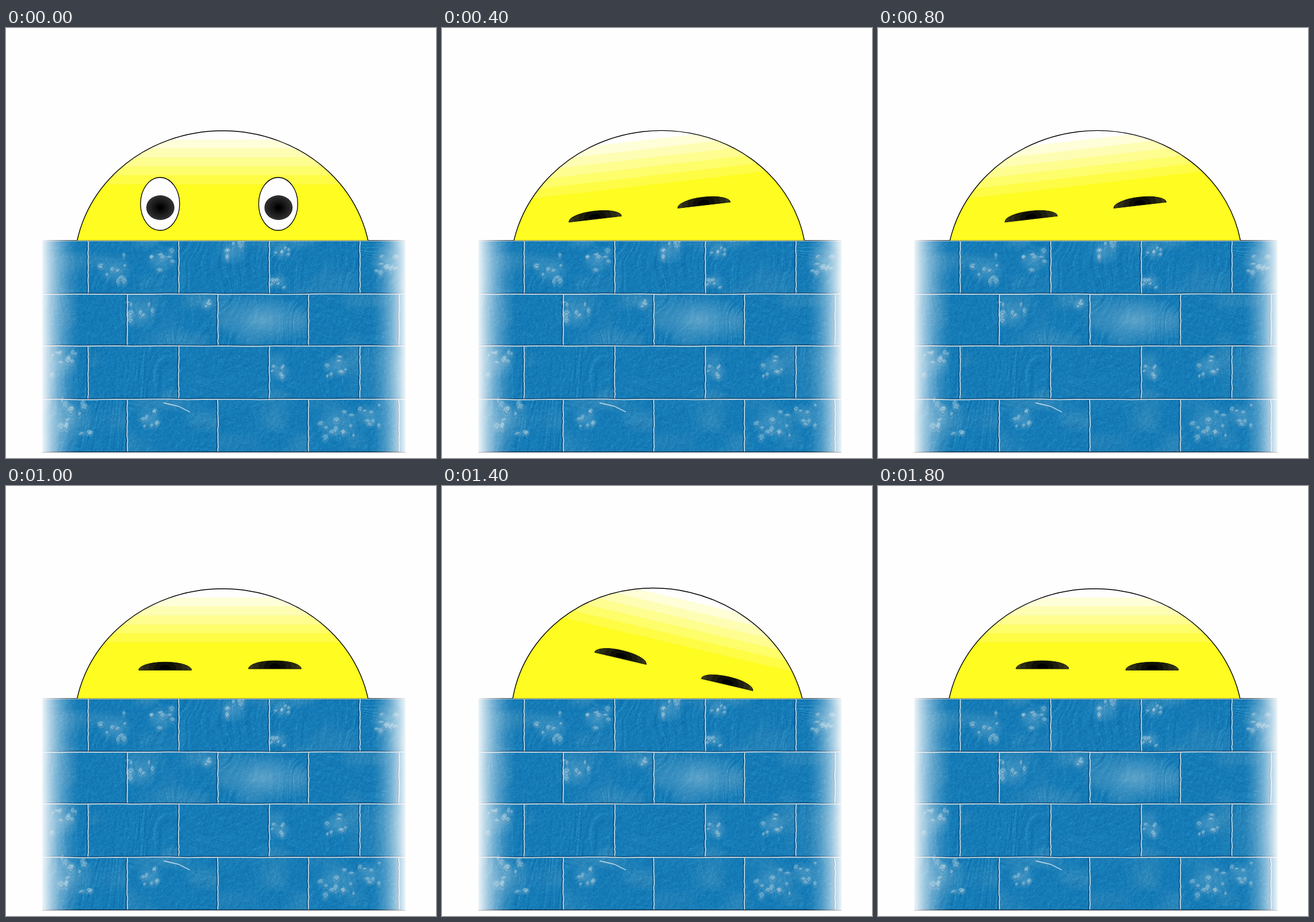
These frames come from a looping animation (748x748 px, 2 s). An HTML page with a canvas:

```html
<!DOCTYPE html>
<html lang="en">
<head>
<meta charset="utf-8">
<title>Peeking over the wall</title>
<style>
  html, body { margin: 0; width: 100%; height: 100%; overflow: hidden; background: #fefefe; }
  svg, canvas { position: absolute; left: 0; top: 0; width: 748px; height: 748px; display: block; }
</style>
</head>
<body>
<canvas id="wall" width="748" height="748"></canvas>
<svg viewBox="0 0 748 748" width="748" height="748">
  <defs>
    <linearGradient id="skin" gradientUnits="userSpaceOnUse" x1="0" y1="178" x2="0" y2="272"></linearGradient>
    <clipPath id="above"><rect width="748" height="369.5"/></clipPath>
    <clipPath id="lid"><path d="M-46 0A46 14 0 0 1 46 0Z"/></clipPath>
    <g id="slit">
      <g id="iris" clip-path="url(#lid)"></g>
      <path d="M-46 0A46 14 0 0 1 46 0Z" fill="none" stroke="#1a1a08"/>
    </g>
    <g id="eye">
      <ellipse rx="34" ry="46" fill="#fefefe" stroke="#000" stroke-width="1.3"/>
      <g id="pupil" transform="translate(.5 6.5)"></g>
    </g>
  </defs>
  <g clip-path="url(#above)">
    <g id="head">
      <ellipse cx="376.8" cy="415.3" rx="257.8" ry="236.6" fill="url(#skin)" stroke="#000" stroke-width="1.4"/>
      <g id="open">
        <use href="#eye" x="268" y="306"/>
        <use href="#eye" x="473.5" y="306"/>
      </g>
      <g id="shut">
        <use href="#slit" x="276.8" y="320.3"/>
        <use href="#slit" x="467.7" y="318"/>
      </g>
    </g>
  </g>
</svg>
<script>
const $ = id => document.getElementById(id);
const CX = 376.8, CY = 415.3, STEP = 200, STEPS = 10;

// --- Face shading in flat bands ---
const range = n => [...Array(n).keys()];

$('skin').innerHTML = range(7).map(i => {
  const c = `rgb(254,${254 - i / 3},${254 - 37 * i})`;
  return `<stop offset="${i / 6}" stop-color="${c}"/><stop offset="${Math.min(1, (i + 1) / 6)}" stop-color="${c}"/>`;
}).join('');

// Nested ellipses darkening to black in the middle
const rings = (n, rx, ry, y, tone) => range(n).map(i => {
  const s = 1 - i / n, c = tone.map(v => v * (n - 1 - i) / (n - 1));
  return `<ellipse cy="${y}" rx="${rx * s}" ry="${ry * s}" fill="rgb(${c})"/>`;
}).join('');

$('iris').innerHTML = rings(5, 48, 30, -3, [59, 58, 29]);
$('pupil').innerHTML = rings(5, 24.5, 21.5, 0, [45, 45, 45]);

// --- Wall ---
const L = 63, R = 695, T = 369, B = 738;
const rows = [T, 463, 553, 646, B];
const joint = (r, k) => (r % 2 ? 211 : 143) + 157.6 * k;

// Knotty places: x, y, spread
const knots = [
  [190, 420, 30], [270, 405, 25], [395, 388, 26], [480, 390, 16], [475, 440, 16],
  [660, 405, 28], [235, 500, 28], [350, 480, 12], [100, 585, 28], [575, 590, 22],
  [478, 600, 18], [115, 680, 40], [250, 680, 22], [575, 685, 36], [630, 675, 24]
];

let seed = 11;
const rnd = () => (seed = seed * 16807 % 2147483647) / 2147483647;
const jitter = size => (rnd() - 0.5) * size;

function hash(x, y) {
  let n = Math.imul(x, 374761393) + Math.imul(y, 668265263) | 0;
  n = Math.imul(n ^ n >>> 13, 1274126177);
  return ((n ^ n >>> 16) >>> 0) / 4294967296;
}

function noise(x, y) {
  const i = Math.floor(x), j = Math.floor(y);
  const ease = v => v * v * (3 - 2 * v);
  const u = ease(x - i), v = ease(y - j);
  const a = hash(i, j), b = hash(i + 1, j), c = hash(i, j + 1), d = hash(i + 1, j + 1);
  return a + (b - a) * u + (c - a) * v + (a - b - c + d) * u * v;
}

// Warped wood fibres with another direction in each brick
function grain(x, y, id) {
  const o = id * 37, turn = 0.5 + id % 5 * 0.3;
  const w = noise(x / 50 + o, y / 45) * 45;
  const p = x * Math.sin(turn) - y * Math.cos(turn) + w;
  const q = x * Math.cos(turn) + y * Math.sin(turn);
  return noise(p / 3.5 + o, q / 30) * 0.9 + noise(p / 9 + o, q / 50) * 1.3 + noise(x / 5 + o, y / 5) * 0.8;
}

function texture(ctx) {
  const w = R - L, img = ctx.createImageData(w, B - T);
  for (let k = 0, i = 0; k < img.data.length; k += 4, i++) {
    const x = i % w, y = Math.floor(i / w);
    const r = rows.findIndex(top => y + T < top) - 1;
    const id = r * 6 + Math.ceil((x + L - joint(r, 0)) / 157.6) + 1;
    const emboss = grain(x + 1, y + 1, id) - grain(x, y, id);
    const pale = Math.max(0, noise(x / 45 + id, y / 35) - 0.5) * 45;
    const v = emboss * 28 + (hash(x, y) - 0.5) * 26;
    const lift = Math.max(0, v - 9) + pale;
    img.data[k] = 21 + v * 0.5 + lift * 1.2;
    img.data[k + 1] = 123 + v * 0.85 + lift * 0.6;
    img.data[k + 2] = 182 + v * 0.75 + lift * 0.2;
    img.data[k + 3] = 255;
  }
  ctx.putImageData(img, L, T);
}

function halo(ctx, x, y, rx, ry, alpha) {
  const g = ctx.createRadialGradient(0, 0, 0, 0, 0, 1);
  g.addColorStop(0, `rgba(165,203,220,${alpha})`);
  g.addColorStop(1, 'rgba(165,203,220,0)');
  ctx.save();
  ctx.translate(x, y);
  ctx.scale(rx, ry);
  ctx.fillStyle = g;
  ctx.fillRect(-1, -1, 2, 2);
  ctx.restore();
}

function knot(ctx, [x, y, spread]) {
  halo(ctx, x, y, spread * 1.1, spread, 0.3);
  for (let i = 0; i < spread / 3; i++) {
    const kx = x + jitter(spread * 1.7), ky = y + jitter(spread * 1.6);
    const rx = 1.5 + rnd() * spread / 10, ry = 2 + rnd() * spread / 9, turn = jitter(1);
    const arc = (color, from, to) => {
      ctx.strokeStyle = color;
      ctx.beginPath();
      ctx.ellipse(kx, ky, rx, ry, turn, from, to);
      ctx.stroke();
    };
    halo(ctx, kx, ky, rx * 2, ry * 2, 0.55);
    arc('rgba(0,70,135,.5)', 0, 2.8);
    arc('rgba(210,226,232,.55)', 3.2, 5.8);
  }
}

function line(ctx, color, width, points) {
  ctx.strokeStyle = color;
  ctx.lineWidth = width;
  ctx.beginPath();
  points.forEach(p => ctx.lineTo(...p));
  ctx.stroke();
}

// A rough light seam with a dark edge beside it
function seam(ctx, x0, y0, x1, y1) {
  const down = x0 === x1;
  const points = range(21).map(i => {
    const s = i / 20, e = jitter(1.2);
    return [x0 + (x1 - x0) * s + (down ? e : 0), y0 + (y1 - y0) * s + (down ? 0 : e)];
  });
  const beside = points.map(([x, y]) => down ? [x - 1.8, y] : [x, y - 1.6]);
  line(ctx, 'rgba(6,44,84,.75)', 1.3, beside);
  line(ctx, '#d3e0e6', 1.6, points);
}

function fade(ctx, from, to) {
  const g = ctx.createLinearGradient(from, 0, to, 0);
  range(9).forEach(i => g.addColorStop(i / 8, `rgba(254,254,254,${0.93 * (1 - i / 8) ** 1.6})`));
  ctx.fillStyle = g;
  ctx.fillRect(Math.min(from, to), T, Math.abs(to - from), B - T);
}

function drawWall() {
  const ctx = $('wall').getContext('2d');
  const edge = (y, width) => line(ctx, '#14283a', width, [[L, y], [R, y]]);
  texture(ctx);
  halo(ctx, 447, 508, 85, 46, 0.5);
  knots.forEach(k => knot(ctx, k));
  line(ctx, 'rgba(205,226,236,.8)', 1.8, [[274, 652], [300, 658], [320, 668]]);
  for (let r = 0; r < 4; r++) {
    if (r) seam(ctx, L, rows[r], R, rows[r]);
    for (let k = 0; joint(r, k) < R; k++) seam(ctx, joint(r, k), rows[r] + 1, joint(r, k), rows[r + 1]);
  }
  line(ctx, '#b9cbd3', 1, [[L, T + 1.5], [R, T + 1.5]]);
  edge(T + 0.5, 1.2);
  edge(B - 0.5, 1.4);
  fade(ctx, L, 128);
  fade(ctx, R, 634);
  line(ctx, '#222c33', 1, [[124, T + 0.5], [630, T + 0.5]]);
}

// --- Head: one open look, then a stepped swing to both sides ---
function render(ms) {
  const step = Math.floor(ms / STEP) % STEPS;
  const swing = step ? Math.asin(Math.sin((step - 1) * Math.PI / 4)) * 2 / Math.PI : 0;
  const size = Math.abs(swing) * 13.2;
  const mirror = swing < 0 ? `translate(${2 * CX} 0) scale(-1 1) ` : '';
  $('head').setAttribute('transform', `${mirror}rotate(${-size} ${CX} ${CY})`);
  $('open').setAttribute('visibility', step ? 'hidden' : 'visible');
  $('shut').setAttribute('visibility', step ? 'visible' : 'hidden');
}

drawWall();
render(0);
let start;
function tick(now) {
  start ??= now;
  render(Math.max(0, now - start));
  requestAnimationFrame(tick);
}
requestAnimationFrame(tick);
</script>
</body>
</html>
```
